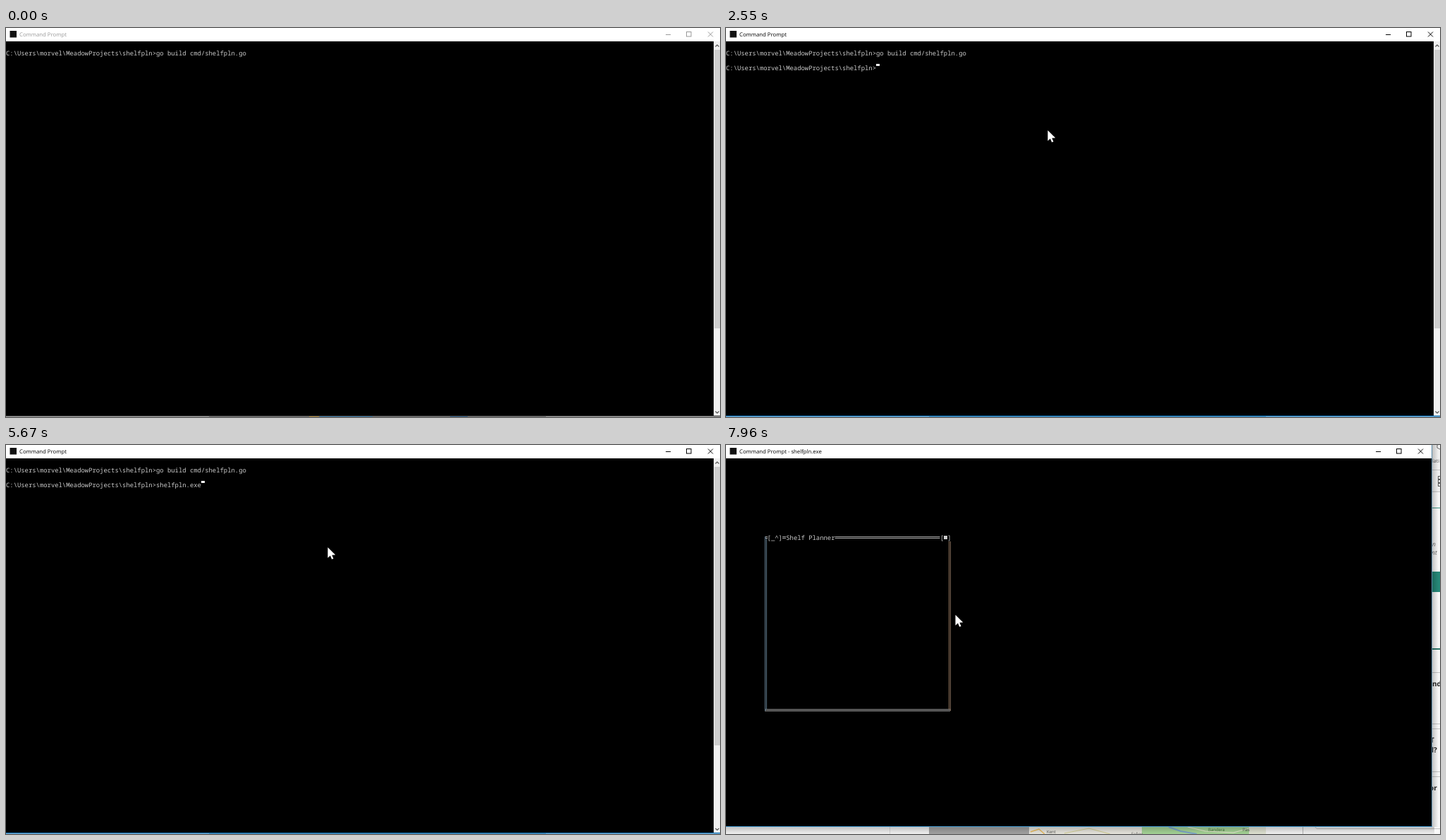
Recreate the animation shown at these times as an HTML page with a canvas. Size 1013x553 px, loop 8 s.

```html
<!DOCTYPE html>
<html lang="en">
<head>
<meta charset="utf-8">
<title>Terminal session</title>
<style>
html, body { margin: 0; width: 100%; height: 100%; overflow: hidden; background: #000; }
canvas { display: block; }
</style>
</head>
<body>
<canvas id="stage" width="1013" height="553"></canvas>
<script>
const ctx = document.getElementById('stage').getContext('2d');
const W = 1013, H = 553, LOOP = 8000;
const CELL = 5.328, ROW = 10.667;
const MONO = '8.88px "Noto Sans Mono", monospace';
const UI = '7.75px "Open Sans", sans-serif';
const PROMPT = 'C:\\Users\\morvel\\MeadowProjects\\shelfpln>';
const BUILD = 'go build cmd/shelfpln.go', CD = 'cd shelfpln', EXE = 'shelfpln.exe';

// [start, second prompt's input, cursor visible]
const INPUT = [
  [0, null, 0], [980, '', 1], [3100, BUILD, 0], [3210, BUILD, 1],
  [3580, CD, 0], [4190, CD, 1], [4670, CD, 0], [4760, BUILD, 1],
  [4970, EXE, 1], [5140, BUILD, 1], [5220, BUILD, 0], [5670, EXE, 1],
  [5760, EXE, 0]
];

// [start, x, y] of the pointer tip
const POINTER = [
  [70, 502, 172], [140, 555, 238], [210, 598, 286], [980, 650, 345],
  [1060, 725, 415], [1140, 759, 447], [1220, 700, 380], [1300, 605, 285],
  [1380, 515, 200], [1460, 466, 155], [1540, 456, 145]
];

const TITLES = [
  [0, ''], [530, ' - go  build cmd/shelfpln.go'], [980, ''], [6380, ' - ' + EXE]
];

const at = (list, t) => list.filter(k => k[0] <= t).pop();

function rect(x, y, w, h, color) {
  ctx.fillStyle = color;
  ctx.fillRect(x, y, w, h);
}

function line(color, width, ...pts) {
  ctx.strokeStyle = color;
  ctx.lineWidth = width;
  ctx.beginPath();
  for (let i = 0; i < pts.length; i += 2) ctx.lineTo(pts[i], pts[i + 1]);
  ctx.stroke();
}

function text(str, x, y, font, color) {
  ctx.font = font;
  ctx.fillStyle = color;
  ctx.fillText(str, x, y);
}

const mono = (str, col, row) =>
  text(str, col * CELL, 38.6 + (row - 1) * ROW, MONO, '#ccc');

const cursor = (col, row) =>
  rect(Math.round(col * CELL), Math.round(30 + row * ROW - 0.1) - 3 - 8, 5, 3, '#f2f2f2');

function titleBar(width, color, title, shift) {
  rect(0, 0, width, 19, '#fff');
  rect(5.5, 4, 9.5, 9.5, '#111');
  text(title, 19, 12, UI, color);
  const x = -shift;
  line(color, 1, x + 936, 9.5, x + 943, 9.5);
  ctx.strokeRect(x + 965.5, 5.5, 6.5, 6.5);
  line(color, 1, x + 996, 5.5, x + 1003, 12.5);
  line(color, 1, x + 1003, 5.5, x + 996, 12.5);
}

function pointer(x, y) {
  ctx.save();
  ctx.translate(x, y);
  ctx.beginPath();
  for (const [px, py] of [[.5, .5], [.5, 15.5], [4, 12.3], [6.3, 17.5], [8.6, 16.5],
                          [6.4, 11.5], [11.3, 11.3]]) ctx.lineTo(px, py);
  ctx.closePath();
  ctx.fillStyle = '#fff';
  ctx.fill();
  ctx.restore();
}

function console1(t) {
  const active = t >= 2550;
  rect(0, 0, W, H, '#000');
  titleBar(W, active ? '#000' : '#999', 'Command Prompt' + at(TITLES, t)[1], 0);

  rect(1004, 19, 9, 533, '#f0f0f0');
  rect(1005, 31, 8, 396, '#cdcdcd');
  line('#505050', 1.2, 1006.5, 26.5, 1009, 24, 1011.5, 26.5);
  line('#505050', 1.2, 1006.5, 545, 1009, 547.5, 1011.5, 545);

  mono(PROMPT + BUILD, 0, 1);
  const [, input, on] = at(INPUT, t);
  if (input !== null) {
    mono(PROMPT + input, 0, 3);
    if (t >= 6300) cursor(0, 4);
    else if (on) cursor(PROMPT.length + input.length, 3);
  }

  // window edge and the sliver of page below it
  rect(0, 551, W, 1, active ? '#0a6fb5' : '#3c3c3c');
  rect(0, 552, W, 1, active ? '#7fb0d2' : '#a8a8a8');
  rect(288, 552, 478, 1, active ? '#4f8db8' : '#777');
  if (!active) {
    const early = t < 530;
    rect(430, 552, early ? 14 : 50, 1, early ? '#b99345' : '#3f6e9c');
    rect(early ? 445 : 515, 552, early ? 75 : 30, 1, '#3f7fae');
    rect(early ? 630 : 585, 552, early ? 25 : 65, 1, '#34618c');
  }
}

function map(t) {
  const step = Math.max(0, Math.min(12, Math.floor((t - 7010) / 79) + 1));
  ctx.save();
  ctx.beginPath();
  ctx.rect(288, 543, 478, 10);
  ctx.clip();
  rect(288, 543, 478, 10, '#eeece4');
  const road = '#d9d59a', label = '6px "Open Sans", sans-serif';
  if (step < 5) {
    ctx.translate(-step * 14, 0);
    line(road, 1.2, 482, 553, 500, 547, 545, 543);
    line(road, 1.2, 618, 543, 632, 549, 660, 547, 690, 553);
    line('#c9d5a5', 2, 640, 553, 655, 543);
    line(road, 1.2, 700, 553, 722, 545, 760, 549);
    rect(505, 543, 2, 2, '#555');
    text('Odessa', 497, 550, label, '#555');
    text('TEXAS', 562, 553.5, '6.5px "Open Sans", sans-serif', '#777');
  } else {
    ctx.translate((12 - step) * 9, 0);
    rect(590, 543, 152, 10, '#a9d99a');
    rect(742, 543, 100, 10, '#e6e9d8');
    line('#f0c060', 1.5, 432, 550, 444, 546, 452, 553);
    line(road, 1.2, 480, 552, 515, 545, 545, 553);
    line('#7fa8cf', 2, 628, 543, 645, 549, 668, 553);
    line('#eef0d8', 1.2, 655, 543, 680, 549, 720, 551, 742, 545);
    text('Kent', 455, 552, label, '#555');
    text('Fallon', 575, 555, label, '#666');
    text('Bandera', 684, 549, label, '#48703f');
    text('Pas', 733, 549, label, '#555');
  }
  ctx.restore();
  rect(288, 543, 142, 10, '#a7a7a7');
}

function page(t) {
  rect(0, 0, W, H, '#f9f9f9');
  rect(1001, 0, 12, 66, '#f2f2f2');
  line('#666', 1, 1013, -1, 1009, 0, 1009, 4, 1013, 6);
  text('lati', 1002, 25, '7px "Open Sans", sans-serif', '#555');
  for (const y of [35, 66, 323, 396, 403, 464, 471]) rect(1001, y, 12, 1, '#c4c4c4');
  ctx.strokeStyle = '#555';
  for (const y of [44.5, 49.5, 54.5]) ctx.strokeRect(1010.5, y, 4, 4);
  rect(1001, 89, 12, 1, '#3a9484');
  rect(1001, 180, 12, 29, '#268878');
  rect(1001, 289, 12, 2, '#2a7568');
  const italic = 'italic 8.5px "Open Sans", sans-serif';
  const bold = 'bold 10px "Open Sans", sans-serif';
  text('n', 1002, 144, italic, '#666');
  text('nt', 1001, 156, italic, '#666');
  text('nd', 1002, 343, bold, '#222');
  text('T', 999, 423, bold, '#222');
  text('l?', 1001, 437, bold, '#222');
  text('or', 998, 491, bold, '#222');

  map(t);
  rect(232, 543, 1, 10, '#ddd');
  rect(818, 543, 1, 10, '#bbb');
  line('#c4c4c4', 1, 836, 543, 838, 545.5, W, 545.5);

  // window shadow
  let g = ctx.createLinearGradient(1001, 0, 1011, 0);
  g.addColorStop(0, 'rgba(0,0,0,.24)');
  g.addColorStop(1, 'rgba(0,0,0,0)');
  rect(1001, 0, 12, 543, g);
  g = ctx.createLinearGradient(0, 543, 0, 553);
  g.addColorStop(0, 'rgba(0,0,0,.22)');
  g.addColorStop(1, 'rgba(0,0,0,.04)');
  rect(0, 543, 1005, 10, g);
}

function console2(t) {
  page(t);
  rect(0, 0, 1001, 542, '#000');
  titleBar(1001, '#000', 'Command Prompt' + at(TITLES, t)[1], 14);
  rect(1001, 0, 1, 543, '#5c8cab');
  rect(0, 542, 1002, 1, '#4aa3dc');

  const frame = '#aaa';
  for (const y of [130.5, 132.5]) {
    rect(55, y - .5, 4, 1, frame);
    rect(80, y - .5, 5, 1, frame);
    rect(154.5, y - .5, 149, 1, frame);
  }
  for (const y of [376, 378]) rect(55, y - .5, 263, 1, frame);
  rect(55, 130, 1, 248, '#668095');
  rect(57, 133, 1, 243, '#5b7688');
  rect(316, 137, 1, 239, '#91745c');
  rect(318, 137, 1, 241, '#806957');
  mono('[_^]', 11, 10);
  mono('Shelf Planner', 16, 10);
  mono('[', 57, 10);
  rect(309, 129, 5, 5, '#ccc');
  mono(']', 59, 10);
}

function draw() {
  const t = performance.now() % LOOP;
  ctx.textRendering = 'geometricPrecision';
  (t < 6530 ? console1 : console2)(t);

  const spot = at(POINTER, t);
  if (spot) {
    const step = Math.max(0, Math.min(9, Math.floor((t - 7010) / 78.75) + 1));
    const p = step / 9, e = p * p * (3 - 2 * p);
    pointer(spot[1] - 131 * e, spot[2] + 96 * e);
  }
  requestAnimationFrame(draw);
}
draw();
</script>
</body>
</html>
```
